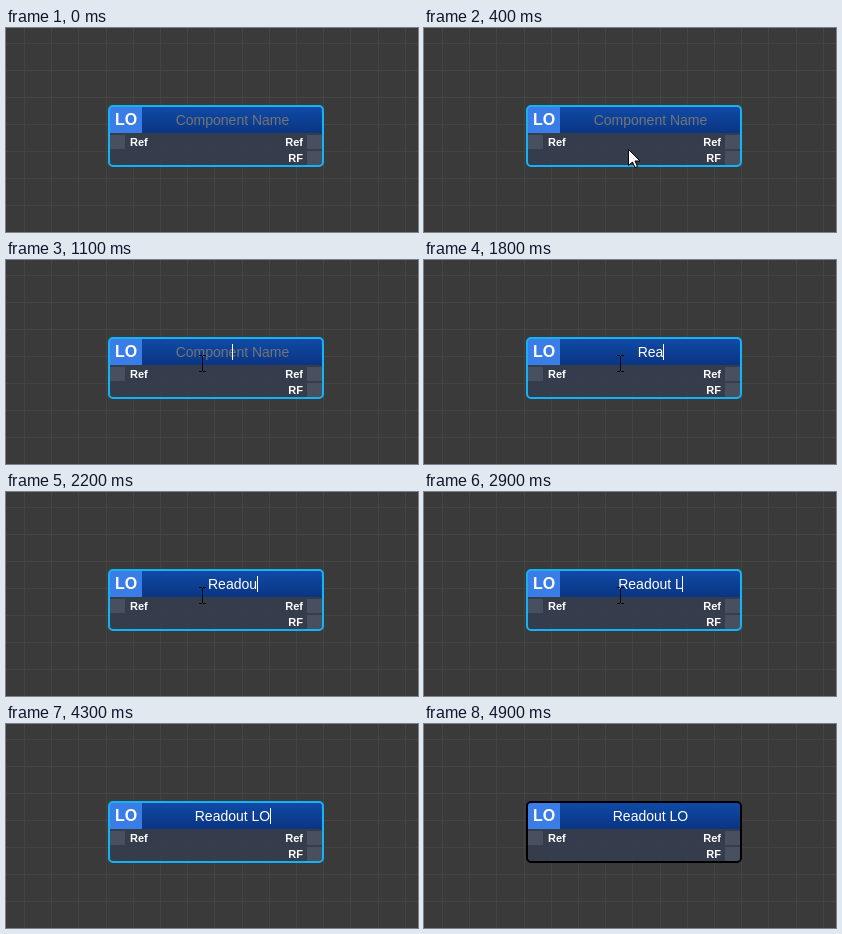
These frames come from a looping animation (412 px wide and 204 px high, 5.5 s). An HTML page with a canvas:

```html
<!DOCTYPE html>
<html lang="en">
<head>
<meta charset="utf-8">
<title>Naming a component</title>
<style>
html, body { margin: 0; width: 100%; height: 100%; overflow: hidden; background: #3a3a3a; }
canvas { display: block; }
</style>
</head>
<body>
<canvas id="stage" width="412" height="204"></canvas>
<script>
const ctx = document.getElementById('stage').getContext('2d');
const LOOP = 5500, STEP = 100;
const FONT = '"Liberation Sans", Arial, sans-serif';
const NAME = 'Readout LO';
const KEY_TIMES = [1400, 1500, 1700, 1900, 2000, 2200, 2300, 2400, 2800, 3000];
const FOCUS = 1000, BLUR = 4600, MID = 226.5;

// time, x, y of the pointer's hot spot
const ENTER = [[100, 225, 176], [300, 208, 133], [500, 199, 108], [600, 197, 105], [700, 197, 105], [1000, 196, 103]];
const LEAVE = [[3800, 196, 103], [3900, 200, 113], [4000, 228, 132], [4200, 352, 190], [4300, 385, 210]];

function rect(x, y, w, h, color) {
  ctx.fillStyle = color;
  ctx.fillRect(x, y, w, h);
}

function text(str, x, y, font, color, align = 'left') {
  ctx.font = font + ' ' + FONT;
  ctx.textAlign = align;
  ctx.fillStyle = color;
  ctx.fillText(str, x, y);
}

function box(x, y, w, h, r) {
  ctx.beginPath();
  ctx.roundRect(x, y, w, h, r);
}

function along(path, t) {
  let i = 0;
  while (i < path.length - 2 && t > path[i + 1][0]) i++;
  const [t0, x0, y0] = path[i], [t1, x1, y1] = path[i + 1];
  const k = Math.min(1, Math.max(0, (t - t0) / (t1 - t0)));
  return [x0 + (x1 - x0) * k, y0 + (y1 - y0) * k];
}

function drawGrid() {
  rect(0, 0, 412, 204, '#3a3a3a');
  for (let x = 18; x < 412; x += 27.2) rect(Math.round(x), 0, 1, 204, '#444');
  for (let y = 15; y < 204; y += 27) rect(0, Math.round(y), 412, 1, '#444');
}

function drawNode(selected) {
  ctx.save();
  box(102, 77, 216, 62, 5);
  ctx.clip();
  rect(102, 77, 216, 62, 'rgba(53,62,80,.88)');
  const blue = ctx.createLinearGradient(0, 79, 0, 105);
  blue.addColorStop(0, '#104aa6');
  blue.addColorStop(1, '#0a3583');
  rect(104, 79, 212, 26, blue);
  rect(104, 79, 32, 26, '#3a7de6');
  for (const [x, y] of [[104, 107], [301, 107], [301, 123]]) rect(x, y, 15, 14, '#485060');
  ctx.restore();

  box(103, 78, 214, 60, 4);
  ctx.lineWidth = 2;
  ctx.strokeStyle = selected ? '#12b4f5' : '#000';
  ctx.stroke();

  text('LO', 120, 97, 'bold 16px', '#fff', 'center');
  text('Ref', 124, 118, 'bold 11px', '#fff');
  text('Ref', 297, 118, 'bold 11px', '#fff', 'right');
  text('RF', 297, 134, 'bold 11px', '#fff', 'right');
}

function drawField(t) {
  const typed = NAME.slice(0, KEY_TIMES.filter(k => t >= k).length);
  if (typed) text(typed, MID, 97, '14px', '#fff', 'center');
  else text('Component Name', MID, 97, '14px', '#757575', 'center');

  if (t < FOCUS || t >= BLUR) return;
  const last = Math.max(FOCUS, ...KEY_TIMES.filter(k => t >= k));
  if (Math.floor((t - last) / 500) % 2) return;
  ctx.font = '14px ' + FONT;
  rect(Math.floor(MID + ctx.measureText(typed).width / 2), 84, 1, 16, '#fff');
}

function drawBeam(x, y) {
  rect(x, y - 7, 1, 15, '#080808');
  for (const end of [y - 8, y + 8]) {
    rect(x - 3, end, 3, 1, '#080808');
    rect(x + 1, end, 3, 1, '#080808');
  }
}

function drawArrow(x, y) {
  const pts = [[0, 0], [0, 16], [4, 12.5], [6.5, 18], [9, 17], [6.5, 11.5], [11.5, 11.5]];
  ctx.beginPath();
  for (const [dx, dy] of pts) ctx.lineTo(x + dx + .5, y + dy + .5);
  ctx.closePath();
  ctx.fillStyle = '#fff';
  ctx.fill();
  ctx.lineWidth = 1;
  ctx.strokeStyle = '#000';
  ctx.stroke();
}

function drawPointer(t) {
  if (t < 100 || t >= 4300) return;
  const [x, y] = along(t < 3800 ? ENTER : LEAVE, t).map(Math.round);
  (y <= 106 ? drawBeam : drawArrow)(x, y);
}

function frame(now) {
  const t = Math.floor((now % LOOP) / STEP) * STEP;
  drawGrid();
  drawNode(t < BLUR);
  drawField(t);
  drawPointer(t);
  requestAnimationFrame(() => frame(performance.now()));
}

frame(performance.now());
</script>
</body>
</html>
```
